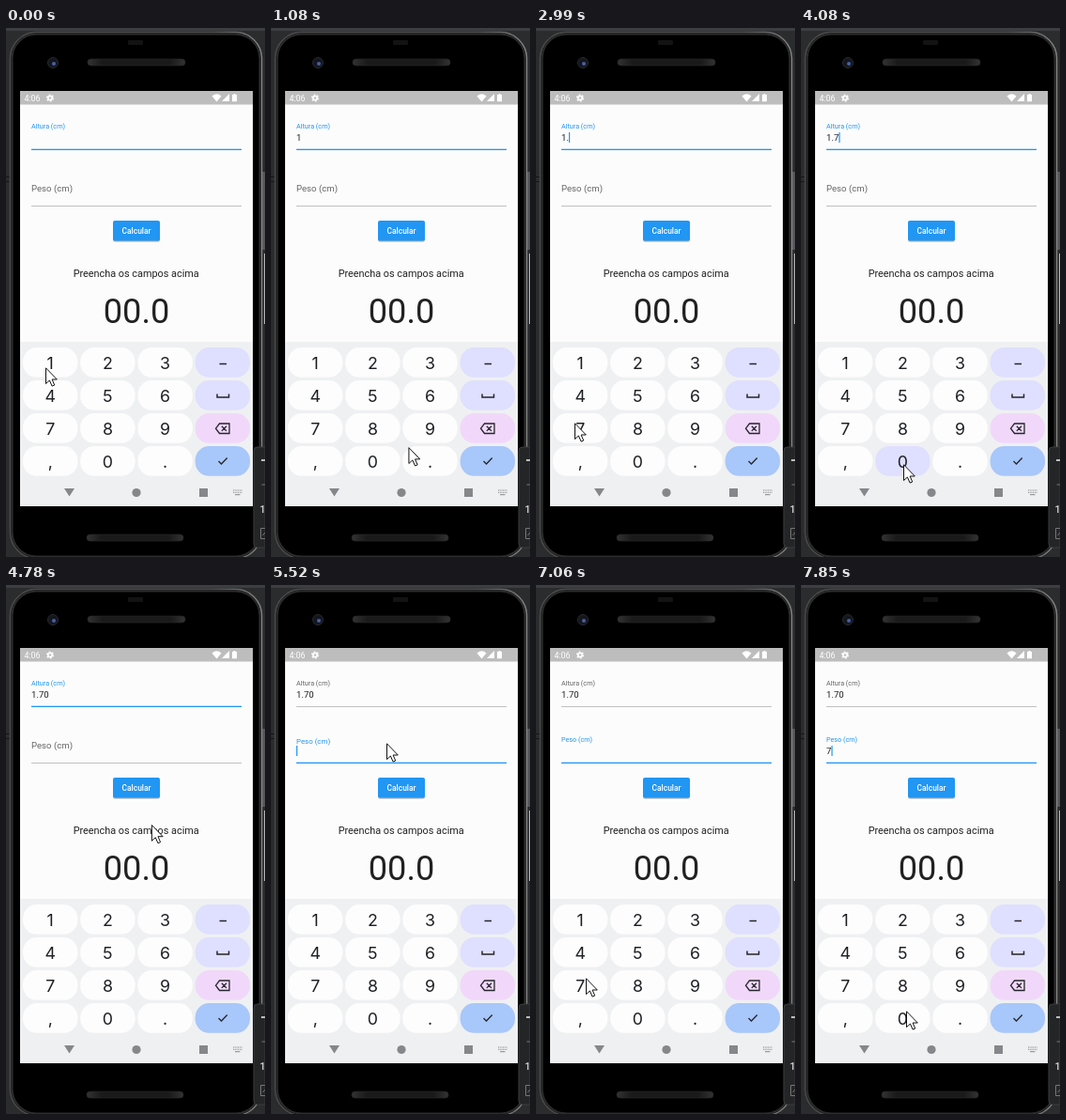
An HTML page that plays this animation: 276 px wide and 563 px high, repeating every 8000 ms.

```html
<!DOCTYPE html>
<html lang="pt">
<head>
<meta charset="utf-8">
<title>Calculadora</title>
<style>
html, body { margin: 0; width: 100%; height: 100%; overflow: hidden; background: #2b2c2e; }
svg { display: block; width: 276px; height: 563px; font-family: Roboto, sans-serif; }
.mid { text-anchor: middle; }
.key { font: 17.8px Inter, sans-serif; fill: #1e2024; }
</style>
</head>
<body>
<svg viewBox="0 0 276 563">
  <defs>
    <linearGradient id="rim">
      <stop offset="0" stop-color="#4c4c4c"/>
      <stop offset=".8" stop-color="#4c4c4c"/>
      <stop offset="1" stop-color="#858585"/>
    </linearGradient>
    <linearGradient id="grille">
      <stop offset="0" stop-color="#333"/>
      <stop offset=".15" stop-color="#1a1a1a"/>
      <stop offset=".85" stop-color="#1a1a1a"/>
      <stop offset="1" stop-color="#333"/>
    </linearGradient>
  </defs>

  <!-- desktop and phone body -->
  <rect width="276" height="563" fill="#2b2c2e"/>
  <rect width="276" height="3" fill="#3c3e41"/>
  <path d="M0 158.500H5M0 163.500H4" stroke="#151515"/>
  <rect x="273" y="153" width="3" height="83" fill="#55575a"/>
  <rect x="275" y="240" width="1" height="75" fill="#b8b8b8"/>
  <rect x="4.500" y="4.500" width="268" height="560" rx="28" fill="#080808" stroke="url(#rim)" stroke-width="1.500"/>
  <rect x="6.500" y="6.500" width="264" height="556" rx="26" fill="#000" stroke="#2c2c2c" stroke-width="2"/>
  <rect x="130" y="13" width="16" height="5" rx="1" fill="#131313"/>
  <circle cx="50" cy="37" r="5.500" fill="#14161d" stroke="#262930"/>
  <circle cx="51" cy="38" r="2" fill="#4a5fa5"/>
  <g fill="url(#grille)" stroke="#272727" stroke-width=".7">
    <rect x="87" y="33" width="104" height="7" rx="3.500"/>
    <rect x="86" y="539" width="103" height="7" rx="3.500"/>
  </g>

  <!-- screen and status bar -->
  <rect x="15" y="67" width="248" height="442" fill="#fcfcfc"/>
  <rect x="15" y="67" width="248" height="14.500" fill="#bdbdbd"/>
  <text x="19.500" y="77.700" font-size="8.800" fill="#fff">4:06</text>
  <circle cx="47" cy="74.500" r="2.200" fill="none" stroke="#fff" stroke-width="1.700"/>
  <circle cx="47" cy="74.500" r="3.500" fill="none" stroke="#fff" stroke-width="1.200" stroke-dasharray="1.830"/>
  <path d="M219.500 72.500Q224.500 68 229.500 72.500L224.500 78.500ZM238 70V78H230ZM241 71H242.500V70H244.500V71H246V78.300H241Z" fill="#fff"/>

  <g id="form"></g>

  <rect x="114" y="206.500" width="50" height="21.500" rx="2.500" opacity=".13"/>
  <rect x="114" y="205.700" width="50" height="21.500" rx="2" opacity=".2"/>
  <rect x="114" y="205" width="50" height="21.500" rx="2" fill="#2196f3"/>
  <text class="mid" x="139" y="219" font-size="8.440" font-weight="500" fill="#fff">Calcular</text>
  <text class="mid" x="138.700" y="264.600" font-size="10.860" fill="#212121">Preencha os campos acima</text>
  <text class="mid" x="139" y="314.300" font-size="36.200" fill="#212121">00.0</text>

  <!-- keyboard and navigation -->
  <rect x="15" y="334" width="248" height="175" fill="#eff0f2"/>
  <g id="keys"></g>
  <g fill="none" stroke="#24262c" stroke-width="1.500">
    <path d="M227.500 357.500H235"/>
    <path d="M225 389.500V393H237.500V389.500"/>
    <path d="M227.500 421H238V431.500H227.500L223.500 426.200ZM229.800 423.700L235 428.900M235 423.700L229.800 428.900" stroke-width="1.300"/>
    <path d="M226.500 461L229.500 464L235.700 457.500" stroke-width="1.300"/>
  </g>
  <g fill="#85878a">
    <path d="M62 490H73L67.500 498.500Z"/>
    <circle cx="139" cy="494.500" r="4.600"/>
    <rect x="206" y="490" width="9" height="9"/>
    <path d="M242 492H251.500M242 494.300H251.500" stroke="#85878a" stroke-dasharray="1 .7"/>
    <path d="M244 496.700H249.500" stroke="#85878a"/>
  </g>

  <!-- side panel -->
  <path d="M276 446H268Q264 446 264 450V549Q264 553 268 553H276Z" fill="#242527" stroke="#3b3c3e"/>
  <path d="M272 460H276" stroke="#eee" stroke-width="1.500"/>
  <path d="M272.500 486H276" stroke="#777"/>
  <text x="270.500" y="516" font-size="10.500" font-weight="500" fill="#ddd">1</text>
  <path d="M276 532.500H271.500V543.500H276M273.500 540L276 537" fill="none" stroke="#777"/>

  <path id="arrow" d="M.5 .8V17.600L4.400 14L7.100 20.100L9.700 19L7.100 13H12.300Z" fill="#fff" stroke="#111" stroke-linejoin="round"/>
</svg>
<script>
const LOOP = 8000;
const STEP = 130;    // the pointer is redrawn at this interval
const HOLD = 150;    // how long a key stays tinted before it types
const BLINK = 500;
const FOCUS = 5520;  // the weight field is clicked
const BLUE = '#2196f3', PRESSED = '#dfdfff';
const $ = id => document.getElementById(id);

function set(el, attrs) {
  for (const k in attrs) el.setAttribute(k, attrs[k]);
}
function add(parent, tag, attrs, text) {
  const el = document.createElementNS('http://www.w3.org/2000/svg', tag);
  set(el, attrs);
  if (text) el.textContent = text;
  parent.append(el);
  return el;
}

// Keyboard
const keys = {};
const tints = [PRESSED, PRESSED, '#f1d8fa', '#a8c7fa'];
['123', '456', '789', ',0.'].forEach((row, r) => {
  for (let c = 0; c < 4; c++) {
    const x = 18 + c * 61.2, y = 340 + r * 35;
    const key = add($('keys'), 'rect', { x, y, width: 58.4, height: 31.8, rx: 15, fill: tints[r] });
    if (c === 3) continue;
    keys[row[c]] = key;
    add($('keys'), 'text', { class: 'mid key', x: x + 29.2, y: y + 23 }, row[c]);
  }
});

// Input fields
function makeField(name, base) {
  const g = $('form');
  return {
    base,
    label: add(g, 'text', { x: 27 }, name),
    value: add(g, 'text', { x: 27, y: base, 'font-size': 9.65, fill: '#212121' }),
    line: add(g, 'rect', { x: 27, width: 224 }),
    caret: add(g, 'rect', { y: base - 9, width: 1.2, height: 11, fill: BLUE })
  };
}
const height = makeField('Altura (cm)', 120);
const weight = makeField('Peso (cm)', 180);

// lift: 0 = label rests in the field, 1 = label floats above it
function drawField(f, text, focus, lift, caretOn) {
  set(f.label, {
    y: f.base - 6 - 7.3 * lift,
    'font-size': 9.65 - 2.41 * lift,
    fill: focus ? BLUE : '#666'
  });
  f.value.textContent = text;
  set(f.line, focus
    ? { y: f.base + 8.7, height: 1.3, fill: BLUE }
    : { y: f.base + 9, height: .6, fill: '#999' });
  const x = 27 + [...text].reduce((w, ch) => w + (ch === '.' ? 2.54 : 5.42), 0);
  set(f.caret, { x, visibility: focus && caretOn ? 'visible' : 'hidden' });
}

const taps = [
  { at: 420, key: '1' }, { at: 1960, key: '.' }, { at: 3160, key: '7' },
  { at: 4200, key: '0' }, { at: 7460, key: '7' }
];
const typed = (from, to) => taps.filter(p => p.at >= from && p.at <= to).map(p => p.key).join('');

// The caret restarts its blink a little before each tap shows
function caretOn(t) {
  const last = Math.max(...[...taps.map(p => p.at), FOCUS].filter(at => at <= t));
  return last > 0 && Math.floor((t - last + 100) / BLINK) % 2 === 0;
}

// Pointer trips between rests
const trips = [
  { from: 0, to: 120, x: 45, y: 356 },
  { from: 540, to: 1350, x: 168, y: 465 },
  { from: 1960, to: 2980, x: 41, y: 420 },
  { from: 3290, to: 4000, x: 109, y: 464 },
  { from: 4200, to: 4630, x: 166, y: 285 },
  { from: 4630, to: 4930, x: 123, y: 168 },
  { from: 5640, to: 6850, x: 57, y: 372 },
  { from: 6850, to: 7000, x: 53, y: 418 },
  { from: 7460, to: 7800, x: 112, y: 453 }
];
function pointer(t) {
  let x = 42, y = 361;
  for (const trip of trips) {
    const k = Math.min(1, Math.max(0, (t - trip.from) / (trip.to - trip.from)));
    const ease = Math.sin(k * Math.PI / 2);
    x += (trip.x - x) * ease;
    y += (trip.y - y) * ease;
  }
  return [x, y];
}

function draw(now) {
  const t = now % LOOP;
  const onWeight = t >= FOCUS;
  const lift = onWeight ? Math.min(1, .72 + (t - FOCUS) / 400) : 0;
  const caret = caretOn(t);
  drawField(height, typed(0, Math.min(t, FOCUS)), !onWeight, 1, caret);
  drawField(weight, typed(FOCUS, t), onWeight, lift, caret);
  for (const k in keys) {
    const down = taps.some(p => p.key === k && t >= p.at - HOLD && t < p.at);
    set(keys[k], { fill: down ? PRESSED : '#fdfdfd' });
  }
  set($('arrow'), { transform: `translate(${pointer(Math.floor(t / STEP) * STEP)})` });
}

const start = performance.now();
function frame() {
  draw(performance.now() - start);
  requestAnimationFrame(frame);
}
frame();
</script>
</body>
</html>
```
